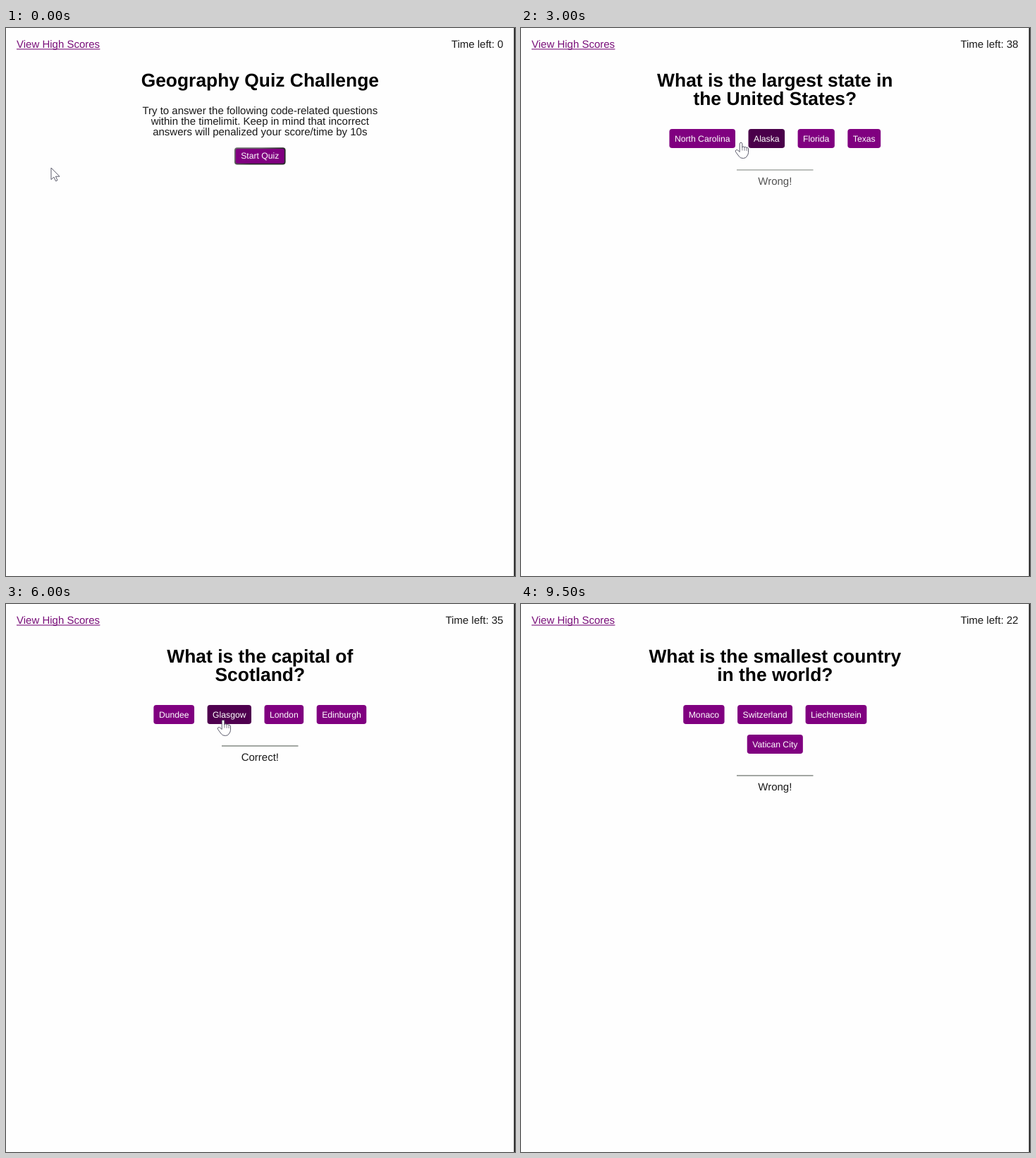
An HTML page with a canvas that plays this animation: 722 px wide and 776 px high, repeating every 10 s.

```html
<!DOCTYPE html>
<html lang="en">
<head>
<meta charset="utf-8">
<title>Geography Quiz Challenge</title>
<style>
  html, body { margin: 0; width: 100%; height: 100%; overflow: hidden; background: #fefefe; }
  canvas { display: block; }
</style>
</head>
<body>
<canvas id="stage" width="722" height="776"></canvas>
<script>
const ctx = document.getElementById('stage').getContext('2d');
const FONT = '"Liberation Sans", Arial, sans-serif';
const MID = 360.3, STEP = 500, LOOP = 10000;
const PAD = 7.5, GAP = 18.5, ROW = 42;

const pages = {
  start: { title: ['Geography Quiz Challenge'] },
  quito: {
    title: ['Quito is the capital of which', 'country?'],
    rows: [['USA', 'Guatemala', 'Ecuador', 'Mexico']]
  },
  state: {
    title: ['What is the largest state in', 'the United States?'],
    rows: [['North Carolina', 'Alaska', 'Florida', 'Texas']],
    verdict: 'Wrong!'
  },
  scotland: {
    title: ['What is the capital of', 'Scotland?'],
    rows: [['Dundee', 'Glasgow', 'London', 'Edinburgh']],
    verdict: 'Correct!'
  },
  smallest: {
    title: ['What is the smallest country', 'in the world?'],
    rows: [['Monaco', 'Switzerland', 'Liechtenstein'], ['Vatican City']],
    verdict: 'Wrong!'
  }
};

// One pose per half second: page, seconds left, pointer, darkened buttons, verdict opacity
const poses = [
  ['start', 0, [64, 198]],
  ['start', 0, [374, 181], { 'Start Quiz': 0.6 }],
  ['quito', 0, [374, 181]],
  ['quito', 0, [376, 168], { Ecuador: 0.5 }],
  ['quito', 49, [340, 158], { Guatemala: 0.6 }],
  ['quito', 49, [332, 158], { Guatemala: 1 }],
  ['state', 38, [312, 162], { Alaska: 0.42 }, 0.75],
  ['state', 38, [346, 165], { Alaska: 0.8 }],
  ['state', 37, [414, 164], { Florida: 0.9 }],
  ['state', 37, [342, 166], { Alaska: 0.12, Florida: 0.62 }],
  ['state', 36, [342, 164], { Alaska: 1 }],
  ['scotland', 36, [345, 166], { Glasgow: 0.3 }, 0.9],
  ['scotland', 35, [308, 164], { Glasgow: 0.38 }],
  ['scotland', 35, [262, 162], { Dundee: 0.5 }],
  ['scotland', 34, [250, 159], { Dundee: 0.87 }],
  ['smallest', 34, [250, 161], { Monaco: 0.6 }, 0.8],
  ['smallest', 23, [262, 176]],
  ['smallest', 23],
  ['smallest', 22],
  ['smallest', 22]
];

function text(str, x, y, size, align = 'center', color = '#1a1a1a', weight = '') {
  ctx.font = `${weight} ${size}px ${FONT}`;
  ctx.textAlign = align;
  ctx.fillStyle = color;
  ctx.fillText(str, x, y);
}

function box(x, y, w, h, r, fill) {
  ctx.beginPath();
  ctx.roundRect(x, y, w, h, r);
  ctx.fillStyle = fill;
  ctx.fill();
}

function purple(dark = 0) {
  const v = Math.round(128 * (1 - dark));
  return `rgb(${v},0,${v})`;
}

function drawStart(hover) {
  const lines = [
    'Try to answer the following code-related questions',
    'within the timelimit. Keep in mind that incorrect',
    'answers will penalized your score/time by 10s'
  ];
  lines.forEach((line, i) => text(line, MID, 122.2 + i * 15, 15));
  const edge = ctx.createLinearGradient(350, 160, 370, 202);
  edge.addColorStop(0.3, '#666');
  edge.addColorStop(0.6, '#2a2a2a');
  box(324, 169.2, 72.6, 24.4, 4, edge);
  box(325.8, 171, 69, 20.8, 2.5, purple(hover['Start Quiz']));
  text('Start Quiz', MID, 185.4, 12.19, 'center', '#fff');
}

function drawAnswers(row, y, hover) {
  ctx.font = `12.19px ${FONT}`;
  const widths = row.map(s => ctx.measureText(s).width + 2 * PAD);
  const total = widths.reduce((a, b) => a + b, GAP * (row.length - 1));
  let x = MID - total / 2;
  row.forEach((label, i) => {
    box(x, y, widths[i], 27, 3.8, purple(hover[label]));
    text(label, x + PAD, y + 17.5, 12.19, 'left', '#fff');
    x += widths[i] + GAP;
  });
}

function drawVerdict(word, y, alpha) {
  ctx.globalAlpha = alpha;
  ctx.fillStyle = '#687068';
  ctx.fillRect(306, y, 108.5, 1.2);
  text(word, MID, y + 21.6, 15);
  ctx.globalAlpha = 1;
}

function outline(path, width) {
  ctx.fillStyle = '#fff';
  ctx.fill(path);
  ctx.strokeStyle = '#5c5c6c';
  ctx.lineWidth = width;
  ctx.lineJoin = 'round';
  ctx.stroke(path);
}

const arrow = new Path2D('M0 0V16.6L3.9 13.1L6.6 18.8L9 17.7L6.4 12.2H12Z');
const hand = new Path2D(
  'M-1.8 13.5V1.7Q-1.6 .3 0 .3T1.8 1.7V7.2Q2 5.8 3.4 5.8T5 7.4Q5.2 6.3 6.5 6.4T8 8' +
  'Q8.3 7.2 9.3 7.4T10.5 9V14.5Q10.4 17 8.8 19Q7.5 22.4 3.4 22.5Q-.8 22.6-2.6 20' +
  'L-7.5 13.4Q-8.3 11.7-7 10.8Q-5.4 10-4 11.4Z');
const knuckles = new Path2D('M1.8 7V11.5M5 7.4V11.8M8 8V12');

function drawPointer([x, y], path) {
  ctx.save();
  ctx.translate(x, y);
  outline(path, 1);
  if (path === hand) {
    ctx.lineWidth = 0.8;
    ctx.stroke(knuckles);
  }
  ctx.restore();
}

function draw(index) {
  const [name, left, pointer, hover = {}, alpha = 1] = poses[index];
  const page = pages[name];
  ctx.fillStyle = '#fefefe';
  ctx.fillRect(0, 0, 722, 776);
  ctx.fillStyle = '#111';
  ctx.fillRect(720.5, 0, 1.5, 776);

  text('View High Scores', 15, 28, 15, 'left', '#7a107a');
  ctx.fillRect(15, 29.4, 118.4, 1.1);
  text('Time left: ' + left, 705.4, 28, 15, 'right');
  page.title.forEach((line, i) =>
    text(line, MID, 83 + i * 26.4, 26.4, 'center', '#000', 'bold'));

  if (page.rows) {
    page.rows.forEach((row, i) => drawAnswers(row, 143 + i * ROW, hover));
    if (page.verdict) drawVerdict(page.verdict, 158.4 + page.rows.length * ROW, alpha);
  } else {
    drawStart(hover);
  }
  if (pointer) drawPointer(pointer, index ? hand : arrow);
}

ctx.textRendering = 'geometricPrecision';
const begin = performance.now();
function tick() {
  draw(Math.floor(((performance.now() - begin) % LOOP) / STEP));
  requestAnimationFrame(tick);
}
tick();
</script>
</body>
</html>
```
